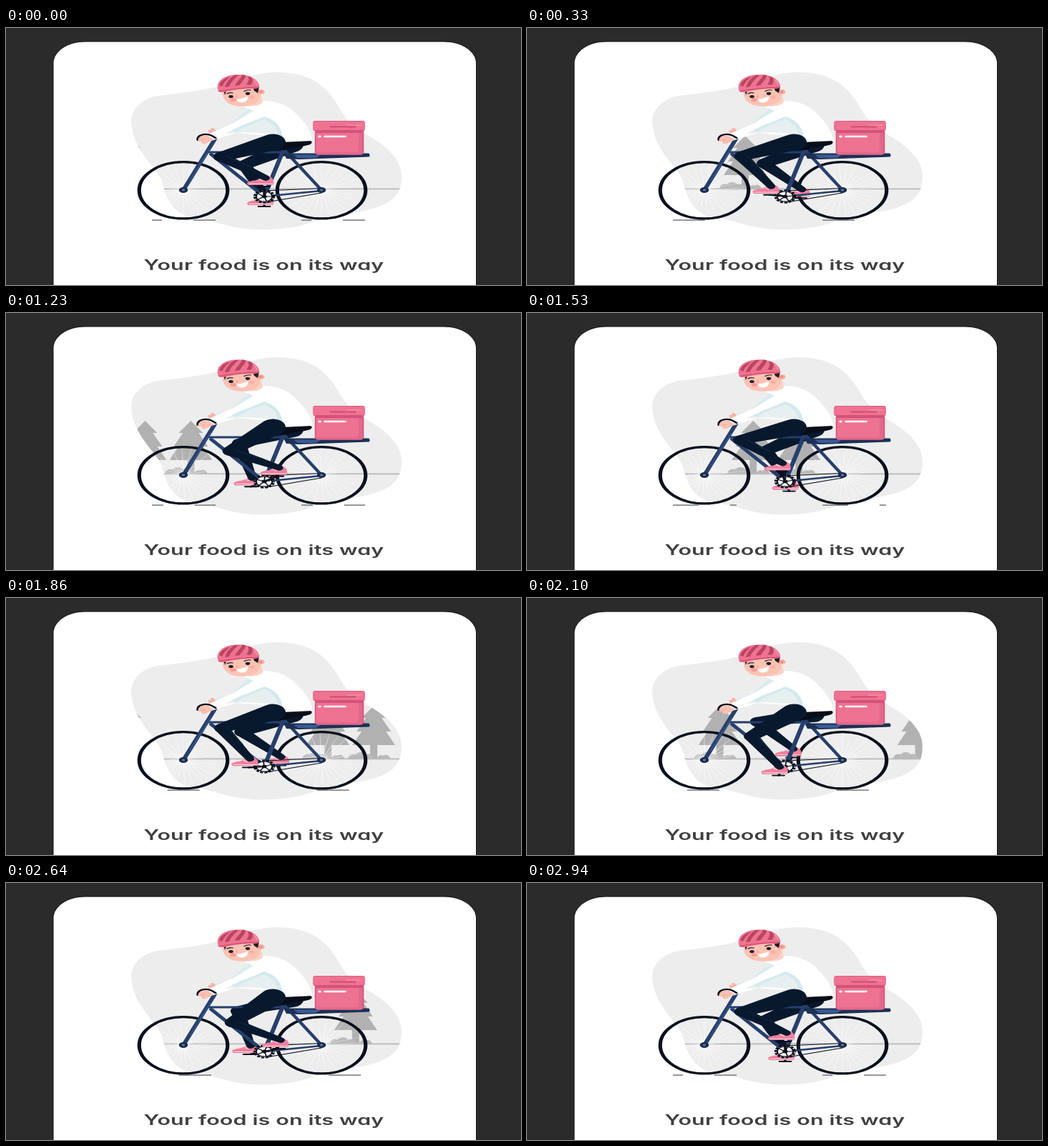
An HTML page with a canvas that plays this animation: 720 by 360 pixels, repeating every 2.97 s.

```html
<!DOCTYPE html>
<html lang="en">
<head>
<meta charset="utf-8">
<title>Delivery status</title>
<style>
  html, body { margin: 0; width: 100%; height: 100%; overflow: hidden; background: #2b2b2b; }
  canvas, svg { position: absolute; left: 0; top: 0; display: block; }
  text { font: 600 19.5px Inter, "Open Sans", sans-serif; font-feature-settings: "cv11"; letter-spacing: .1px; fill: #404040; }
</style>
</head>
<body>
<canvas id="stage" width="720" height="360"></canvas>
<svg width="720" height="360">
  <text transform="scale(1.56 1)" x="231.1" y="339" text-anchor="middle">Your food is on its way</text>
</svg>
<script>
const ctx = document.getElementById('stage').getContext('2d');
const K = 1.56;            // the whole scene is stretched sideways
const LOOP = 2970, CYCLE = 2940, STEP = 30;
const TAU = Math.PI * 2;
const NAVY = '#263f6c', INK = '#0a0f1c', PANTS = '#08192e', SKIN = '#fbc3b3', PINK = '#ee7291', DEEP = '#d4527a';

const BLOB = new Path2D('M175 130C176 113 190 99 212 95C255 90 292 86 325 73C350 63 380 58 412 66C440 74 453 91 464 108' +
  'C476 132 490 141 512 154C538 170 553 188 553 208C553 230 543 243 519 251C492 261 456 260 430 271' +
  'C398 284 350 285 320 279C290 272 275 266 255 264C232 258 223 236 218 215C212 195 176 172 175 130Z');

function fill(d, color) {
  ctx.fillStyle = color;
  ctx.fill(typeof d === 'string' ? new Path2D(d) : d);
}

function stretched(draw) {
  ctx.save();
  ctx.scale(K, 1);
  draw();
  ctx.restore();
}

// Points are stage pixels; the pen itself is stretched.
function line(d, color, width, cap = 'round') {
  const path = new Path2D();
  path.addPath(new Path2D(d), { a: 1 / K, d: 1 });
  stretched(() => {
    ctx.lineCap = cap;
    ctx.lineJoin = 'round';
    ctx.strokeStyle = color;
    ctx.lineWidth = width;
    ctx.stroke(path);
  });
}

function disc(x, y, r, color) {
  stretched(() => {
    ctx.beginPath();
    ctx.arc(x / K, y, r, 0, TAU);
    ctx.fillStyle = color;
    ctx.fill();
  });
}

function ring(x, y, r, color, width, dash = [], shift = 0) {
  stretched(() => {
    ctx.beginPath();
    ctx.arc(x / K, y, r, 0, TAU);
    ctx.setLineDash(dash);
    ctx.lineDashOffset = shift;
    ctx.lineCap = 'butt';
    ctx.strokeStyle = color;
    ctx.lineWidth = width;
    ctx.stroke();
  });
}

function spokes(x, y, r, count, turn, style, width) {
  stretched(() => {
    ctx.strokeStyle = style;
    ctx.lineWidth = width;
    ctx.beginPath();
    for (let i = 0; i < count; i++) {
      const a = i * TAU / count - turn;
      ctx.moveTo(x / K, y);
      ctx.lineTo(x / K + r * Math.cos(a), y + r * Math.sin(a));
    }
    ctx.stroke();
  });
}

// Tapered limb between two points with end radii ra and rb.
function limb(a, b, ra, rb, color) {
  const ax = a[0] / K, bx = b[0] / K;
  const turn = Math.atan2(b[1] - a[1], bx - ax);
  stretched(() => {
    ctx.beginPath();
    ctx.arc(ax, a[1], ra, turn + Math.PI / 2, turn - Math.PI / 2);
    ctx.arc(bx, b[1], rb, turn - Math.PI / 2, turn + Math.PI / 2);
    ctx.closePath();
    ctx.fillStyle = color;
    ctx.fill();
  });
}

const mix = (a, b, p) => a + (b - a) * p;
const mixPoint = (a, b, p) => [mix(a[0], b[0], p), mix(a[1], b[1], p)];
function ramp(t, from, to) {
  const p = Math.min(1, Math.max(0, (t - from) / (to - from)));
  return p * p * (3 - 2 * p);
}

function card() {
  ctx.fillStyle = '#2b2b2b';
  ctx.fillRect(0, 0, 720, 360);
  const d = 'M66.5 362V49C66.5 33 86 19.5 111 19.5H612C637 19.5 657 33 657 49V362Z';
  ctx.strokeStyle = '#141414';
  ctx.lineWidth = 2;
  ctx.stroke(new Path2D(d));
  fill(d, '#fff');
}

function tree(x) {
  fill(`M${x} 151l17 17h-6l13 19h-7l13 19h-25v20h-10v-20h-25l13-19h-7l13-19h-6Z`, '#b1b1b1');
  fill(`M${x - 36} 226c0-6 6-9 11-7c3-4 11-4 14 0c6-2 11 2 11 7Z`, '#bababa');
  fill(`M${x + 4} 226c1-5 6-7 9-5c4-3 10 0 10 5Z`, '#bababa');
}

function scenery(t) {
  fill(BLOB, '#ededed');
  ctx.save();
  ctx.clip(BLOB);
  for (const start of [171, -305, -241, -583]) tree(start + .406 * t);
  ctx.fillStyle = '#b9b9b9';
  ctx.fillRect(219, 224.5, 335, 1.8);
  ctx.restore();
}

function road(t) {
  const span = 89, dash = 45;
  const shift = (58 + t * span * 12 / CYCLE) % span;
  ctx.fillStyle = '#77777d';
  for (const left of [204, 413]) {
    for (const s of [shift, shift - span]) {
      const from = Math.max(0, s), to = Math.min(span, s + dash);
      if (to > from) ctx.fillRect(left + from, 268.4, to - from, 1.5);
    }
  }
}

function wheel(x, t) {
  const y = 227.3;
  const glow = ctx.createRadialGradient(x / K, y, 2, x / K, y, 39);
  glow.addColorStop(0, 'rgba(255,255,255,1)');
  glow.addColorStop(.5, 'rgba(255,255,255,.6)');
  glow.addColorStop(1, 'rgba(255,255,255,.2)');
  spokes(x, y, 39, 28, t * TAU * 3 / CYCLE, glow, .65);
  ring(x, y, 39.6, INK, 3.3);
}

function pedal(angle) {
  return [361 - 14 * K * Math.sin(angle), 236 - 14 * Math.cos(angle)];
}

function shoe([x, y]) {
  ctx.save();
  ctx.translate(x, y);
  fill('M-7-9L1-15L9-14L8-7Z', SKIN);
  fill('M-24-4C-24-7-17-8-11-9L-2-13C3-9 6-11 9-13C13-11 14-7 13-3L-22-2Z', '#f2809e');
  line('M-21-3.6H12', '#fff', .8);
  line('M-22-2.4H12', '#e0607f', .8);
  line('M-7-10L-2-8', '#fff', .8);
  ctx.restore();
}

function crank([x, y]) {
  line(`M361 236L${x} ${y}`, INK, 2.2);
  line(`M${x - 8} ${y}h16`, INK, 1.8);
}

function leg(hip, foot, width) {
  const thigh = 51, shin = 50;
  const ankle = [foot[0] + 2, foot[1] - 12];
  const dx = (hip[0] - ankle[0]) / K, dy = ankle[1] - hip[1];
  const reach = Math.min(Math.hypot(dx, dy), thigh + shin - .1);
  const bend = Math.acos((thigh ** 2 + reach ** 2 - shin ** 2) / (2 * thigh * reach));
  const a = Math.atan2(dx, dy) + bend;
  const knee = [hip[0] - thigh * K * Math.sin(a), hip[1] + thigh * Math.cos(a)];
  shoe(foot);
  limb(knee, ankle, 6.4, 3.8, PANTS);
  limb(hip, knee, width, 6.5, PANTS);
  return { knee, ankle };
}

function farArm(t) {
  const up = ramp(t, 330, 600) * (1 - ramp(t, 960, 1230));
  const sway = up * 4 * Math.sin((t - 780) * TAU / 360);
  const elbow = mixPoint([316, 140], [317, 129], up);
  const hand = mixPoint([289, 145], [282, 113], up);
  hand[0] += sway;
  limb([350, 114], elbow, 6, 4.5, '#d9ecef');
  limb(elbow, hand, 4.3, 2.8, '#d9ecef');
  const [x, y] = hand;
  fill(`M${x + 6} ${y + 2}C${x + 2} ${y + 6} ${x - 5} ${y + 4} ${x - 6} ${y}C${x - 8} ${y - 3} ${x - 3} ${y - 2} ${x - 2} ${y - 2}` +
    `C${x - 4} ${y - 6} ${x} ${y - 6} ${x + 3} ${y - 3}Z`, '#f8b3a6');
}

function frame() {
  line('M390 172L441 227', NAVY, 3.4);
  line('M361 236L441 228', NAVY, 2.6);
  line('M285 174H388', NAVY, 3);
  line('M287 177L361 236', NAVY, 3.8);
  line('M389 168L361 236', NAVY, 4);
  line('M362 228L441 224.5M364 244L441 231', INK, 1.2);
  line('M248 227L293 154', NAVY, 4);
  line('M257 214L286 168', '#3a5688', .8);
  for (const x of [248, 441]) {
    disc(x, 227, 4, '#1c2c4c');
    disc(x, 227, 1.4, '#5e79a8');
  }
  fill('M388 175.5H507C509 176.5 509 180 507 180.5L410 184L392 183Z', '#1d3054');
  fill('M402 177.5H440L434 182H408Z', '#3a5a96');
}

function chainring(angle) {
  disc(361, 236, 8, '#f4f4f4');
  ring(361, 236, 8.6, INK, 2.2, [2.6, 1.35], angle * 8.6);
  ring(361, 236, 7.2, INK, 1.3);
  spokes(361, 236, 7, 5, angle, INK, 1.1);
  disc(361, 236, 2.3, INK);
}

function box() {
  fill('M432 143H500V174C500 176 498 177.5 495 177.5H437C434 177.5 432 176 432 174Z', PINK);
  fill('M493 143H500V174C500 176 498 177.5 495 177.5H437C434 177.5 432 176 432 174H487C491 174 493 172 493 169Z', '#e4688b');
  fill('M432 143H500V147H432Z', DEEP);
  fill('M433 130H498C501 130 502 131.5 502 133V141C502 143 501 144 498 144H433C430 144 429 143 429 141V133C429 131.5 430 130 433 130Z', PINK);
  line('M431 143.5H500M432.5 146V175M499.5 146V175', DEEP, 1);
  line('M431 130.5H500', '#dd5d84', 1);
  line('M454 138.5H488', '#d14d75', 1.8);
  line('M477 136H496', '#f59ab2', 1);
  line('M446 152H474', '#fff', 2.6);
  disc(438.5, 152, 1.5, '#fff');
}

function torso() {
  fill('M328 108C346 114 350 104 361 102C388 103 400 113 412 127C423 139 428 150 428 158L386 160L372 151L322 147L287 158L277 151L318 133L346 116Z', '#fff');
  fill('M306 148L330 136L361 125L380 136L386 157L366 148L332 146Z', '#e8eff0');
  fill('M316 143L361 124C377 129 386 138 387 157L380 152C380 142 374 134 361 128L333 139L322 146Z', '#d3eaee');
}

function head() {
  fill('M334 96L357 94L359 104C354 110 340 111 332 107Z', '#fcd3c6');
  fill('M303 87L350 82C357 88 357 97 352 103C345 110 326 112 314 107C305 103 302 96 303 87Z', SKIN);
  disc(356, 89.5, 3.6, '#f8ae9f');
  disc(356, 89.5, 1.7, '#ee8f86');
  fill('M345 83L354 82L352 91L347 88Z', '#271c24');
  fill('M304 87L309 86L306 94Z', '#271c24');
  disc(317.5, 100.5, 2.6, '#f99a95');
  disc(344, 97, 2.4, '#fab0a6');
  line('M309 92Q313 90 317 91M333 88.5Q338 86 342 87', '#271c24', 1.1);
  disc(314.5, 96, 2.1, '#231a24');
  disc(338, 91.8, 2.1, '#231a24');
  fill('M323 99.5C328 99.5 334 97.5 338 95.5C339 102 334 104.5 330 104.5C326 104.5 323 103 323 99.5Z', '#fff');
  line('M323 94.5L321.5 97H324.5', '#ee958a', .7);
}

function helmet() {
  fill('M296 86C294 76 301 69 315 66C337 62.5 351 70 354 80C355 85 350 85 341 85C326 85 314 88 303 90C298 90.5 297 89 296 86Z', PINK);
  line('M298 88.5C313 86 330 83.5 352 83', '#c74663', 1.2);
  for (const d of [
    'M298 80C300 75 305 70 313 68.5C308 73 304 77 302 82Z',
    'M306 83C308 76 313 70 320 66L325 66C318 72 314 77 312 82Z',
    'M320 81C322 75 329 71 330 65.5L335 66C335 72 328 76 327 80Z',
    'M336 79C340 75 340 71 338 67.5L343 69C346 73 345 76 342 80Z'
  ]) fill(d, '#b8455f');
  line('M347 73Q350 76 351 80', '#f59cb1', .9);
}

function nearHand() {
  line('M268 157C267 149 280 147 288 151L293 154', INK, 2.2);
  fill('M284 152C280 149 271 151 269 155C267 159 271 160 273 158C272 162 277 164 281 161L291 156Z', '#fac0b1');
  line('M273 158L278 156', '#ee9b90', .7);
}

function saddle() {
  fill('M374 157C393 160 407 156 422 156.5C430 158 429 163 422 164C411 167 402 166 395 169C388 173 379 171 374 166Z', '#080d18');
}

function draw(t) {
  const angle = t * TAU * 2 / CYCLE;
  const near = pedal(angle), far = pedal(angle + Math.PI);
  card();
  scenery(t);
  road(t);
  wheel(248, t);
  wheel(441, t);
  farArm(t);
  crank(far);
  leg([400, 164], far, 10);
  frame();
  chainring(angle);
  crank(near);
  saddle();
  box();
  torso();
  const { knee, ankle } = leg([373, 160], near, 11.5);
  line(`M${knee[0] + 8} ${knee[1] - 1}L${mix(knee[0], ankle[0], .6) + 6} ${mix(knee[1], ankle[1], .6) - 3}`, '#1b2f47', .7);
  head();
  helmet();
  nearHand();
}

let shown = -1;
const begin = performance.now();
function tick() {
  const t = Math.floor(((performance.now() - begin) % LOOP) / STEP) * STEP;
  if (t !== shown) draw(shown = t);
  requestAnimationFrame(tick);
}
tick();
</script>
</body>
</html>
```
